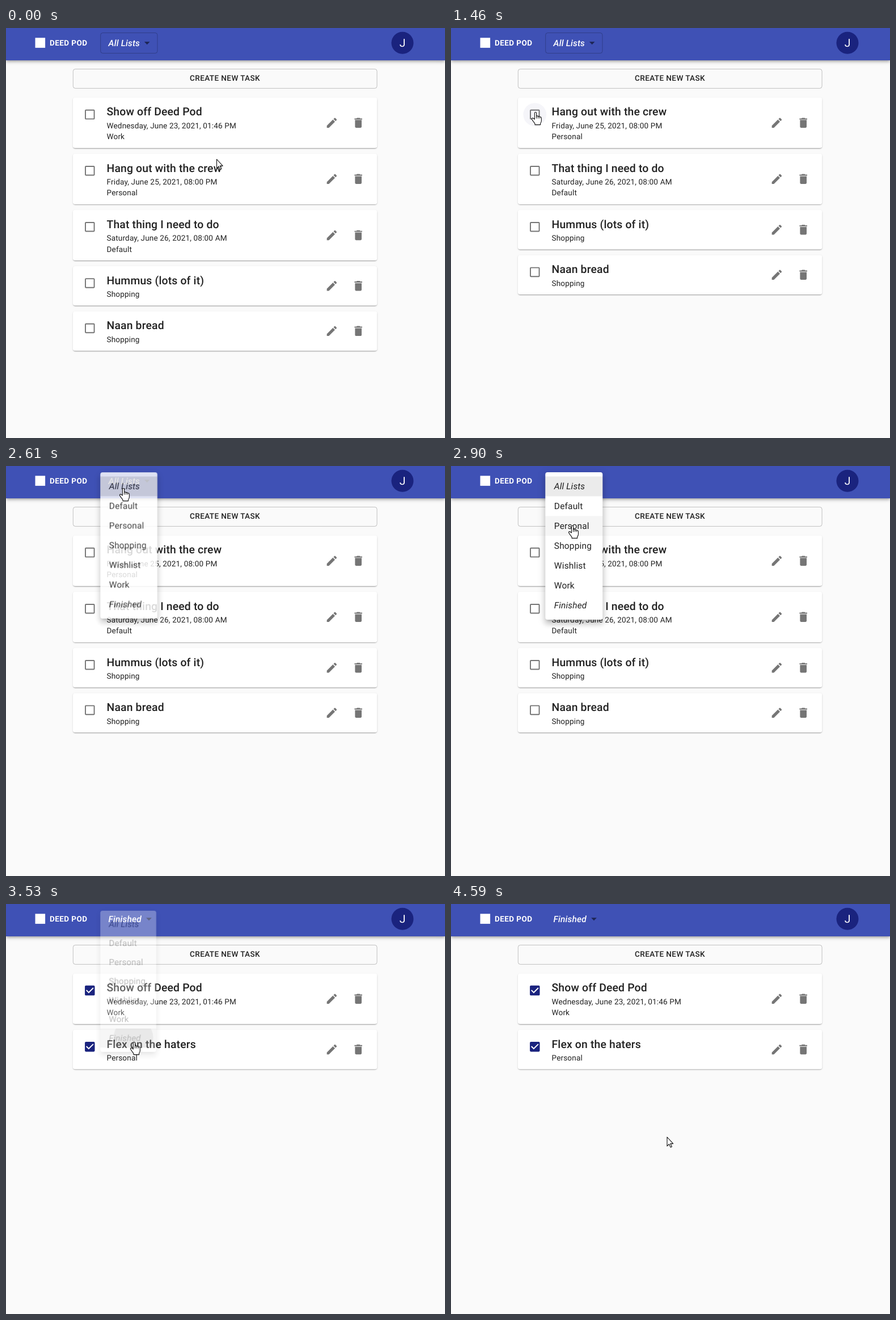
Write an HTML page with a canvas that moves like this. It is 774 px wide and 723 px high and loops after 4.94 s.

```html
<!DOCTYPE html>
<html lang="en">
<head>
<meta charset="utf-8">
<title>Task list</title>
<style>
html, body { margin: 0; width: 100%; height: 100%; overflow: hidden; background: #fafafa; }
canvas { display: block; width: 774px; height: 723px; }
</style>
</head>
<body>
<canvas id="stage"></canvas>
<script>
const W = 774, H = 723, LOOP = 4940, S = 0.97;
const DPR = window.devicePixelRatio || 1;
const PRIMARY = '#3f51b5', NAVY = '#1a237e';
const INK = 'rgba(0,0,0,.87)', SOFT = 'rgba(0,0,0,.54)', EDGE = 'rgba(0,0,0,.23)';

const T = { press: 1330, done: 1430, open: 2445, pressItem: 3360, pick: 3395, closed: 3697 };
const GROW = 302;

const TASKS = [
  ['Show off Deed Pod', 'Wednesday, June 23, 2021, 01:46 PM', 'Work'],
  ['Hang out with the crew', 'Friday, June 25, 2021, 08:00 PM', 'Personal'],
  ['That thing I need to do', 'Saturday, June 26, 2021, 08:00 AM', 'Default'],
  ['Hummus (lots of it)', '', 'Shopping'],
  ['Naan bread', '', 'Shopping']
];
const FINISHED = [TASKS[0], ['Flex on the haters', '', 'Personal']];
const LISTS = ['All Lists', 'Default', 'Personal', 'Shopping', 'Wishlist', 'Work', 'Finished'];
const MENU = { x: 166.3, y: 11, w: 101, h: 260, top: 18.4, row: 34.95 };

// Cursor stops: time, x, y
const PATH = [
  [30, 371, 231], [530, 141, 151], [770, 149, 148], [2030, 149, 148],
  [2445, 207, 39], [2700, 207, 39], [3230, 229, 243], [3400, 226, 243],
  [3620, 226, 243], [4590, 380.5, 410.5]
];

const ICONS = {
  box: new Path2D('M19 5v14H5V5h14m0-2H5c-1.1 0-2 .9-2 2v14c0 1.1.9 2 2 2h14c1.1 0 2-.9 2-2V5c0-1.1-.9-2-2-2z'),
  checked: new Path2D('M19 3H5c-1.11 0-2 .9-2 2v14c0 1.1.89 2 2 2h14c1.11 0 2-.9 2-2V5c0-1.1-.89-2-2-2zm-9 14l-5-5 1.41-1.41L10 14.17l7.59-7.59L19 8l-9 9z'),
  edit: new Path2D('M3 17.25V21h3.75L17.81 9.94l-3.75-3.75L3 17.25zM20.71 7.04c.39-.39.39-1.02 0-1.41l-2.34-2.34c-.39-.39-1.02-.39-1.41 0l-1.83 1.83 3.75 3.75 1.83-1.83z'),
  trash: new Path2D('M6 19c0 1.1.9 2 2 2h8c1.1 0 2-.9 2-2V7H6v12zM19 4h-3.5l-1-1h-5l-1 1H5v2h14V4z'),
  drop: new Path2D('M7 10l5 5 5-5z')
};
const ARROW = new Path2D('M.5 .5V16.4L4.1 13 6.6 18.6 8.9 17.6 6.4 12.1H11.2Z');
const HAND = new Path2D('M-1.6 13V2Q-1.6 .5 0 .5T1.6 2V7.2Q3.4 6.4 4.6 7.9Q6.5 7.1 7.6 8.8Q10.4 8.3 10.4 11V15.5Q10.4 18 8.6 20V22.6H-1V20.6Q-2.4 18.6-4 16.6L-6 13.6Q-7.2 11.7-5.8 11Q-4.4 10.4-3 12Z');
const KNUCKLES = new Path2D('M1.6 7V11.5M4.6 8V11.5M7.6 9V11.5');

function surface(canvas) {
  canvas.width = Math.round(W * DPR);
  canvas.height = Math.round(H * DPR);
  const c = canvas.getContext('2d');
  c.scale(DPR, DPR);
  c.textRendering = 'geometricPrecision';
  return c;
}
const main = surface(document.getElementById('stage'));
const layer = surface(document.createElement('canvas'));
let g = main;

const clamp = v => Math.max(0, Math.min(1, v));
const smooth = u => u * u * (3 - 2 * u);

// cubic-bezier(.4, 0, .2, 1)
function ease(v) {
  const x = clamp(v);
  let lo = 0, hi = 1, u = x;
  for (let i = 0; i < 24; i++) {
    u = (lo + hi) / 2;
    const q = 1 - u;
    if (1.2 * q * q * u + 0.6 * q * u * u + u * u * u < x) lo = u; else hi = u;
  }
  return 3 * (1 - u) * u * u + u * u * u;
}

function text(s, x, y, size, o = {}) {
  g.font = `${o.italic ? 'italic ' : ''}${o.weight || 400} ${size * S}px Roboto, sans-serif`;
  g.letterSpacing = (o.gap || 0) * size * S + 'px';
  g.textAlign = o.align || 'left';
  g.fillStyle = o.color || INK;
  g.fillText(s, x, y);
}

function rounded(x, y, w, h, r) {
  g.beginPath();
  g.roundRect(x, y, w, h, r);
}

function disc(x, y, r, color) {
  g.beginPath();
  g.arc(x, y, r, 0, 7);
  g.fillStyle = color;
  g.fill();
}

function icon(name, cx, cy, color) {
  g.save();
  g.translate(cx - 12 * S, cy - 12 * S);
  g.scale(S, S);
  g.fillStyle = color;
  g.fill(ICONS[name]);
  g.restore();
}

// Each shadow: offset y, blur, spread, alpha
function panel(x, y, w, h, r, color, shadows) {
  const far = 2000;
  for (const [dy, blur, grow, alpha] of shadows) {
    g.save();
    g.shadowColor = `rgba(0,0,0,${alpha})`;
    g.shadowBlur = blur * S * DPR;
    g.shadowOffsetX = far * DPR;
    g.shadowOffsetY = dy * S * DPR;
    rounded(x - grow - far, y - grow, w + 2 * grow, h + 2 * grow, r);
    g.fillStyle = '#000';
    g.fill();
    g.restore();
  }
  rounded(x, y, w, h, r);
  g.fillStyle = color;
  g.fill();
}

function cursorAt(t) {
  if (t <= PATH[0][0]) return { x: PATH[0][1], y: PATH[0][2] };
  for (let i = 1; i < PATH.length; i++) {
    const [t0, x0, y0] = PATH[i - 1], [t1, x1, y1] = PATH[i];
    if (t < t1) {
      const e = smooth((t - t0) / (t1 - t0));
      return { x: x0 + (x1 - x0) * e, y: y0 + (y1 - y0) * e };
    }
  }
  const end = PATH[PATH.length - 1];
  return { x: end[1], y: end[2] };
}

function hoverOf(p, t) {
  if (t >= T.open && t < 3640) return 'menu';
  if (Math.hypot(p.x - 147.8, p.y - 152.5) < 20.4) return 'check';
  if (p.x > 118 && p.x < 654 && p.y > 72 && p.y < 106.5) return 'create';
  if (p.x > 166 && p.x < 268 && p.y > 8 && p.y < 45) return 'select';
  return '';
}

function header(t, hover) {
  panel(0, -10, W, 67, 0, PRIMARY, [[2, 4, -1, .2], [4, 5, 0, .14], [1, 10, 0, .12]]);
  g.fillStyle = '#fff';
  g.fillRect(51.5, 17.3, 17.6, 17.6);
  text('DEED POD', 77, 30.6, 14, { weight: 700, gap: .02857, color: '#fff' });

  const picked = t >= T.pick;
  if (t < T.open) {
    rounded(166.7, 8.5, 100.3, 36, 4);
    g.lineWidth = 1;
    g.strokeStyle = hover === 'select' ? INK : EDGE;
    g.stroke();
  }
  text(picked ? 'Finished' : 'All Lists', 180.6, 32, 16,
    { italic: true, weight: 500, gap: .00938, color: '#fff' });
  icon('drop', picked ? 252 : 248.7, 26.3, SOFT);

  disc(699, 26.2, 19.5, NAVY);
  text('J', 699, 33.2, 20, { align: 'center', color: '#fff' });
}

function createButton(hover) {
  rounded(118.3, 72.4, 535.8, 34, 4);
  if (hover === 'create') {
    g.fillStyle = 'rgba(0,0,0,.02)';
    g.fill();
  }
  g.lineWidth = 1;
  g.strokeStyle = EDGE;
  g.stroke();
  text('CREATE NEW TASK', 386, 93.4, 14, { weight: 500, gap: .02857, align: 'center' });
}

function cards(list, checked, t, hover) {
  let y = 122.6;
  list.forEach(([title, date, group], i) => {
    const h = date ? 89.2 : 69.7;
    panel(117.9, y, 536.5, h, 4, '#fff', [[2, 1, -1, .2], [1, 1, 0, .14], [1, 3, 0, .12]]);
    const cy = y + 30;
    if (i === 0 && hover === 'check') {
      disc(147.8, cy, 20.4, 'rgba(26,35,126,.045)');
      if (t >= T.press && t < T.done)
        disc(147.8, cy, 20.4 * ease((t - T.press + 40) / 250), 'rgba(26,35,126,.18)');
    }
    icon(checked ? 'checked' : 'box', 147.8, cy, checked ? NAVY : SOFT);
    text(title, 177.5, y + 31.8, 20, { weight: 500, gap: .0075 });
    if (date) text(date, 177.5, y + 54.3, 14, { gap: .01071 });
    text(group, 177.5, y + (date ? 73.7 : 54.3), 14, { gap: .01071 });
    icon('edit', 574.4, y + h / 2, SOFT);
    icon('trash', 621.2, y + h / 2, SOFT);
    y += h + 9.9;
  });
}

function drawMenu(t, p) {
  g = layer;
  g.clearRect(0, 0, W, H);
  panel(MENU.x, MENU.y, MENU.w, MENU.h, 4, '#fff', [[5, 5, -3, .2], [8, 10, 1, .14], [3, 14, 2, .12]]);
  const picked = t >= T.pick ? 6 : 0;
  const over = Math.floor((p.y - MENU.top) / MENU.row);
  LISTS.forEach((name, i) => {
    const y = MENU.top + i * MENU.row;
    const shade = i === picked ? (i === over ? .12 : .08) : (i === over ? .04 : 0);
    g.fillStyle = `rgba(0,0,0,${shade})`;
    g.fillRect(MENU.x, y, MENU.w, MENU.row);
    if (i === 6 && t >= T.pressItem) {
      g.save();
      g.beginPath();
      g.rect(MENU.x, y, MENU.w, MENU.row);
      g.clip();
      disc(226, 245, 90 * ease((t - T.pressItem) / 550), 'rgba(0,0,0,.2)');
      g.restore();
    }
    text(name, 181.8, y + 22.7, 16, { gap: .00938, italic: i === 0 || i === 6 });
  });
  g = main;
}

function menu(t, p) {
  if (t < T.open || t > T.closed) return;
  let size, alpha;
  if (t < T.pick) {
    const d = t - T.open;
    size = ease(d / (GROW * .666));
    alpha = ease(d / GROW);
  } else {
    const d = t - T.pick;
    size = 1 - ease((d - GROW * .333) / (GROW * .666));
    alpha = 1 - ease(d / GROW);
  }
  drawMenu(t, p);
  g.save();
  g.globalAlpha = alpha;
  g.translate(MENU.x, 31);
  g.scale(.75 + .25 * size, .5625 + .4375 * size);
  g.translate(-MENU.x, -31);
  g.drawImage(layer.canvas, 0, 0, W, H);
  g.restore();
}

function pointer(p, hand) {
  g.save();
  g.translate(p.x, p.y);
  g.lineWidth = 1.1;
  g.lineJoin = 'round';
  g.fillStyle = '#fff';
  g.strokeStyle = '#111';
  const shape = hand ? HAND : ARROW;
  g.fill(shape);
  g.stroke(shape);
  if (hand) g.stroke(KNUCKLES);
  g.restore();
}

function draw(t) {
  const p = cursorAt(t), hover = hoverOf(p, t);
  g.fillStyle = '#fafafa';
  g.fillRect(0, 0, W, H);
  header(t, hover);
  createButton(hover);
  const picked = t >= T.pick;
  cards(picked ? FINISHED : t < T.done ? TASKS : TASKS.slice(1), picked, t, hover);
  menu(t, p);
  pointer(p, hover !== '');
}

const start = performance.now();
function tick() {
  draw((performance.now() - start) % LOOP);
  requestAnimationFrame(tick);
}
tick();
</script>
</body>
</html>
```
